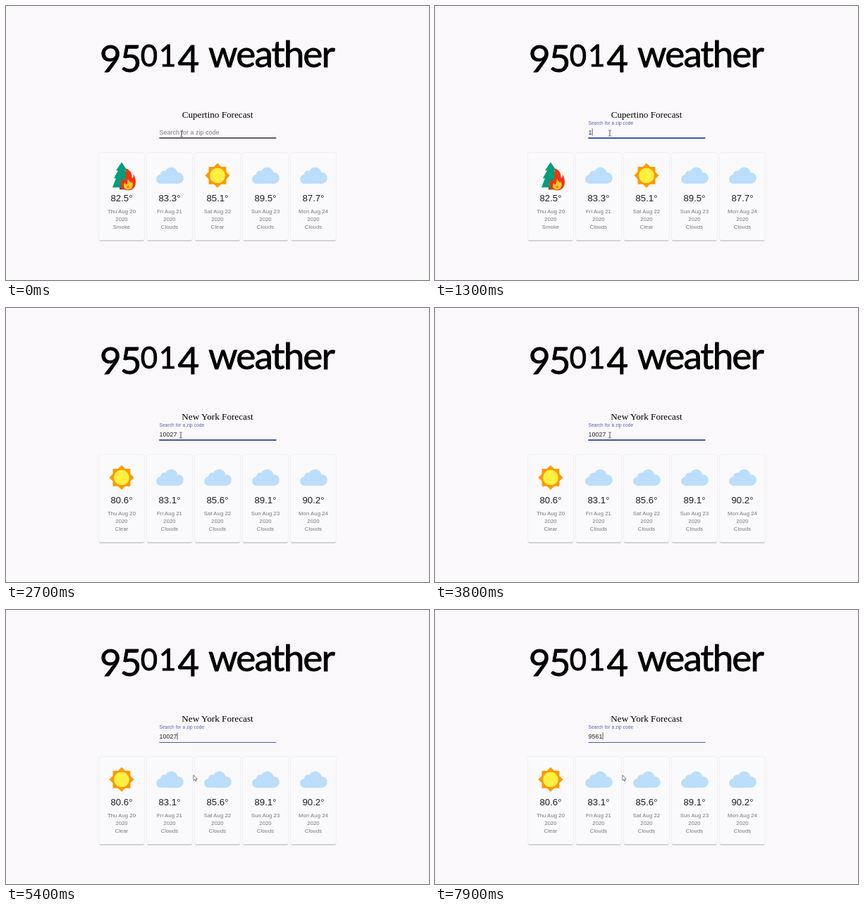
An HTML page for the animation above (8000 ms loop, 600 by 390 pixels).

```html
<!DOCTYPE html>
<html lang="en">
<head>
<meta charset="utf-8">
<title>95014 weather</title>
<style>
  html, body { margin: 0; width: 100%; height: 100%; overflow: hidden; background: #faf8fb; }
  svg { display: block; width: 600px; height: 390px; }
  text { font-family: Arial, "Liberation Sans", sans-serif; white-space: pre; }
  .heading { font: 400 53px Lato, "Open Sans", sans-serif; letter-spacing: -1.9px; stroke: #000; stroke-width: .8px; }
  .heading .low { font-size: 42px; letter-spacing: 2px; }
  .city { font: 13.2px "Times New Roman", "Liberation Serif", serif; text-anchor: middle; }
  .field { font-size: 8.8px; letter-spacing: .00938em; }
  .temp { font-size: 13.2px; fill: #212121; text-anchor: middle; }
  .note { font-size: 7.7px; letter-spacing: .01071em; fill: #777; text-anchor: middle; }
</style>
</head>
<body>
<svg viewBox="0 0 600 390">
  <defs>
    <g id="Clouds" fill="#bbdefb">
      <circle cx="-12.5" cy="5.2" r="6.4"/>
      <circle cx="-7.3" cy="-1.2" r="5.8"/>
      <circle cx="2.5" cy="-2.7" r="9"/>
      <circle cx="11.8" cy="3.6" r="8"/>
      <path d="M-12.5 -1H12V11.6H-12.5Z"/>
    </g>
    <g id="Clear">
      <g fill="#ff9800">
        <rect x="-12.4" y="-12.4" width="24.8" height="24.8"/>
        <rect x="-12.4" y="-12.4" width="24.8" height="24.8" transform="rotate(45)"/>
      </g>
      <circle r="10.8" fill="#fdf040"/>
    </g>
    <g id="Smoke">
      <path d="M-3 15H3V20H-3Z" fill="#795548"/>
      <path d="M0 -19L8 -7H5L11 4H8L13 17H-13L-8 4H-11L-5 -7H-8Z" fill="#009e7c"/>
      <path d="M7 -10C16 -5 14 1 15 4C17 3 17 0 16.500 -2C22 5 22 21 9 21C-4 21 -3 8 2 4C2 7 3 8 4 8C8 3 4 -4 7 -10Z" fill="#f4330c"/>
      <path d="M9 5C11 9 13 8 13 11C14 10 14 9 14 8C18 14 15 20 9 20C2 20 2 13 5 10C5 12 6 13 7 13C9 10 8 8 9 5Z" fill="#ffc928"/>
      <circle cx="9" cy="16" r="1.800" fill="#ff7a1a"/>
    </g>
    <g id="card">
      <rect x="-32" y="1" width="64" height="124.8" rx="2.4" fill="#bdbcbf"/>
      <rect x="-32.5" y="-.4" width="65" height="125.2" rx="2.4" fill="#e6e5e8"/>
      <rect x="-32" width="64" height="124" rx="2" fill="#faf9fb"/>
    </g>
  </defs>

  <rect width="600" height="390" fill="#faf8fb"/>
  <text class="heading" x="133" y="94">95<tspan class="low" dy="-8">01</tspan><tspan dy="8">4</tspan></text>
  <text class="heading" x="287" y="87">weather</text>
  <text class="city" id="city" x="300" y="159"></text>

  <text class="field" id="label">Search for a zip code</text>
  <text class="field" id="value" x="217.500" y="183" fill="#222"></text>
  <rect id="caret" y="174.500" width=".8" height="10" fill="#333"/>
  <rect id="baseline" x="217.500" width="165.800"/>
  <rect id="focusLine" fill="#3f51b5"/>

  <g id="cards"></g>

  <path id="beam" d="M-1.800 -4H-.5L0 -3.500L.5 -4H1.800M0 -3.500V3.500M-1.800 4H-.5L0 3.500L.5 4H1.800" fill="none" stroke="#333" stroke-width=".8"/>
  <path id="arrow" d="M0 0V7.600L1.700 6.100L2.800 8.600L4 8.100L2.900 5.700H5.200Z" fill="#fff" stroke="#333" stroke-width=".6"/>
</svg>
<script>
const LOOP = 8000, STEP = 100, FIELD_X = 217.5, FIELD_W = 165.8;
const $ = id => document.getElementById(id);
const days = ["Thu Aug 20", "Fri Aug 21", "Sat Aug 22", "Sun Aug 23", "Mon Aug 24"];
const forecasts = [
  { city: "Cupertino", temps: ["82.5", "83.3", "85.1", "89.5", "87.7"],
    sky: ["Smoke", "Clouds", "Clear", "Clouds", "Clouds"] },
  { city: "New York", temps: ["80.6", "83.1", "85.6", "89.1", "90.2"],
    sky: ["Clear", "Clouds", "Clouds", "Clouds", "Clouds"] }
];
const typing = [
  [0, ""], [1300, "1"], [1600, "10"], [1700, "100"], [2000, "1002"], [2200, "10027"],
  [6200, "1002"], [6400, "100"], [6500, "10"], [6600, "1"], [6700, ""],
  [7300, "9"], [7500, "95"], [7800, "956"], [7900, "9561"]
];
// time, x, y of the mouse
const mousePath = [
  [0, 249, 182], [300, 249, 182], [600, 248, 181], [3900, 248, 181],
  [4200, 610, 50], [4500, 610, 50], [4800, 418, 165], [5100, 418, 165],
  [5400, 266, 235], [LOOP, 266, 235]
];

const clamp = v => Math.max(0, Math.min(1, v));
const mix = (a, b, p) => a + (b - a) * p;
const easeOut = p => 1 - (1 - clamp(p)) ** 3;
const set = (el, attrs) => { for (const k in attrs) el.setAttribute(k, attrs[k]); };

function mouseAt(t) {
  const i = mousePath.findIndex(p => p[0] > t);
  const [t0, x0, y0] = mousePath[i - 1], [t1, x1, y1] = mousePath[i];
  const p = (t - t0) / (t1 - t0);
  return [mix(x0, x1, p), mix(y0, y1, p)];
}

function caretOn(t) {
  if (t < 300) return false;
  if (t < 1300) return t < 900;
  if (t < 2200) return true;
  if (t < 6200) return Math.floor((t - 2150) / 530) % 2 === 0;
  return t >= 7300 || (t >= 6700 && t < 6900);
}

function cardMarkup(data, i) {
  const x = 164 + 68 * i;
  const note = (y, s) => `<text class="note" x="${x}" y="${y}">${s}</text>`;
  return `<use href="#card" x="${x}" y="209"/>
    <use href="#${data.sky[i]}" x="${x}" y="241.3"/>
    <text class="temp" x="${x}" y="277.8">${data.temps[i]}°</text>
    ${note(295, days[i])}${note(306, "2020")}${note(317, data.sky[i])}`;
}

let shown;
function showForecast(data) {
  if (data === shown) return;
  shown = data;
  $("city").textContent = data.city + " Forecast";
  $("cards").innerHTML = days.map((_, i) => cardMarkup(data, i)).join("");
}

function draw(t) {
  showForecast(forecasts[t < 2600 ? 0 : 1]);

  const focus = easeOut((t - 250) / 200);
  set($("label"), {
    transform: `translate(${FIELD_X} ${mix(183, 169, focus)}) scale(${mix(1, .75, focus)})`,
    fill: focus > 0 ? "#5562b4" : "#7b7a7c"
  });

  const hover = t < 4000;
  set($("baseline"), { y: hover ? 187.2 : 188, height: hover ? 1.4 : .6, fill: hover ? "#222" : "#8d8c8e" });
  set($("focusLine"), {
    x: FIELD_X + FIELD_W * (1 - focus) / 2, width: FIELD_W * focus,
    y: hover ? 187.1 : 188, height: hover ? 1.6 : .9
  });

  const value = typing.filter(k => k[0] <= t).pop()[1];
  $("value").textContent = value;
  set($("caret"), { x: FIELD_X + .2 + value.length * 4.98, opacity: +caretOn(t) });

  const [x, y] = mouseAt(t);
  const place = `translate(${x} ${y})`;
  set($("beam"), { transform: place, opacity: +hover });
  set($("arrow"), { transform: place, opacity: +!hover });
}

function tick() {
  draw(Math.floor(performance.now() % LOOP / STEP) * STEP);
  requestAnimationFrame(tick);
}
tick();
</script>
</body>
</html>
```
